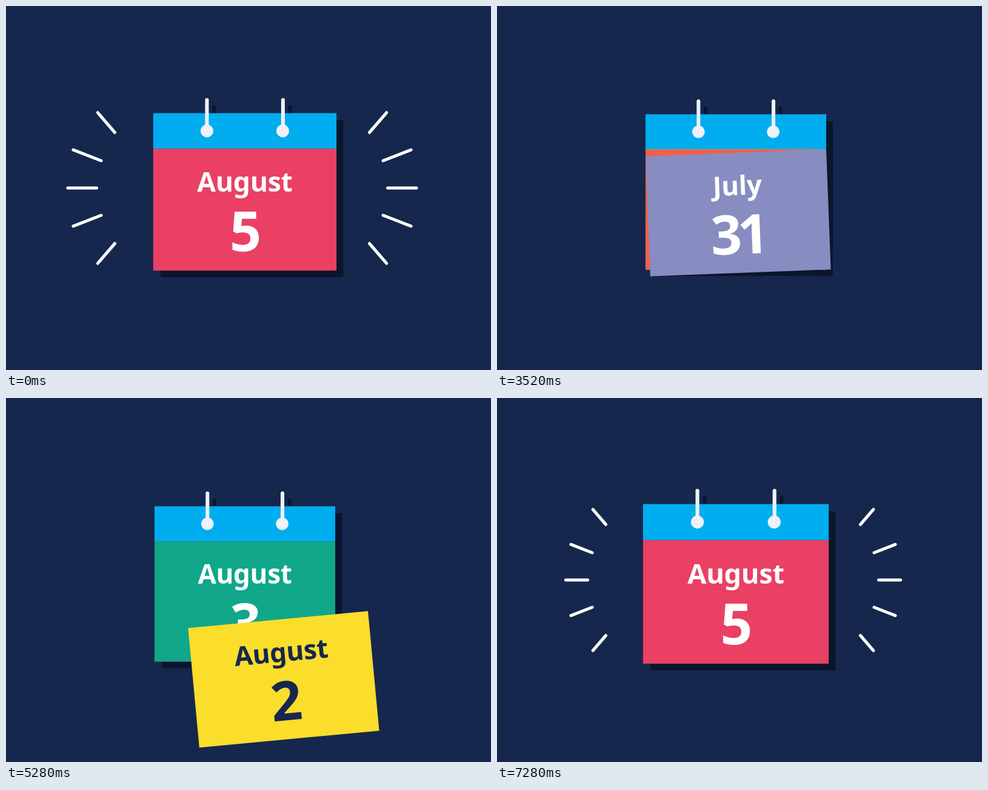
Write an HTML page that moves like this. It is 800 by 600 pixels and loops after 7320 ms.

```html
<!DOCTYPE html>
<html lang="en">
<head>
<meta charset="utf-8">
<title>Calendar</title>
<style>
  html, body { margin: 0; width: 100%; height: 100%; overflow: hidden; background: #16274e; }
  svg { display: block; width: 100%; height: 100%; }
  text { text-anchor: middle; }
  .month { font: 700 44px "Noto Sans", sans-serif; letter-spacing: -.3px; }
  .day { font: 750 90px "Open Sans", sans-serif; letter-spacing: -7px; }
  .hooks line { stroke-width: 6; stroke-linecap: round; }
</style>
</head>
<body>
<svg viewBox="0 0 800 600">
  <defs>
    <linearGradient id="redFade" x2="0" y2="1">
      <stop stop-color="#ea4064" stop-opacity=".55"/>
      <stop offset="1" stop-color="#ea4064" stop-opacity="0"/>
    </linearGradient>
    <linearGradient id="shadeFade" x2="0" y2="1">
      <stop stop-color="#0a162c"/>
      <stop offset="1" stop-color="#0a162c" stop-opacity="0"/>
    </linearGradient>
  </defs>
  <g id="rays" stroke="#fff" stroke-width="5" stroke-linecap="round"></g>
  <g id="calendar">
    <rect id="shade" x="257" y="190" width="297" fill="#0a162c"/>
    <rect id="shadeBlur" x="257" width="297" fill="url(#shadeFade)"/>
    <g class="hooks" stroke="#0a162c">
      <line x1="344" x2="344" y1="169" y2="195"/>
      <line x1="467.5" x2="467.5" y1="169" y2="195"/>
    </g>
    <rect id="pageBlur" x="245" y="434" width="298" fill="url(#redFade)"/>
    <rect x="245" y="178.5" width="298" height="58" fill="#00adef"/>
    <g class="hooks" stroke="#eef1f9" fill="#eef1f9">
      <line x1="332.3" x2="332.3" y1="157" y2="207"/>
      <line x1="456" x2="456" y1="157" y2="207"/>
      <circle cx="332.3" cy="207.3" r="10.4" stroke="none"/>
      <circle cx="455.6" cy="207.3" r="10.4" stroke="none"/>
    </g>
    <g id="pages"></g>
  </g>
</svg>
<script>
const LOOP = 7320, STEP = 40;
const BURST = 7104, BURST_GAP = 960;
const DROP = 2740, FIRST_FALL = 3280, FALL_GAP = 800;

// month, day, page colour, text colour; top page first
const PAGES = [
  ['July', 31, '#878dc1', '#fff'],
  ['August', 1, '#f1604d', '#fff'],
  ['August', 2, '#fbdd2c', '#16274e'],
  ['August', 3, '#10a78b', '#fff'],
  ['August', 4, '#296694', '#fff'],
  ['August', 5, '#ea4064', '#fff']
];

// inner end and full reach of the upper left rays
const RAYS = [
  [149.5, 300, -62.5, 0],
  [157, 255, -60.5, -23.5],
  [179.5, 208.5, -37, -43]
];

const $ = id => document.getElementById(id);
const clamp = x => Math.min(1, Math.max(0, x));
const ease = x => (1 - Math.cos(Math.PI * clamp(x))) / 2;

function add(parent, name, attrs, text = '') {
  const el = document.createElementNS('http://www.w3.org/2000/svg', name);
  set(el, attrs);
  el.textContent = text;
  return parent.appendChild(el);
}

function set(el, attrs) {
  for (const key in attrs) el.setAttribute(key, attrs[key]);
}

function show(el, on) {
  el.setAttribute('visibility', on ? 'inherit' : 'hidden');
}

const pages = PAGES.map(([month, day, fill, ink]) => {
  const g = add(document.createDocumentFragment(), 'g', {});
  add(g, 'rect', { x: 245, y: 236.3, width: 298, height: 198, fill });
  add(g, 'text', { class: 'month', x: 394, y: 306, fill: ink }, month);
  add(g, 'text', { class: 'day', x: 391.5, y: 403, fill: ink }, day);
  $('pages').prepend(g);
  return g;
});

const rays = [];
for (const [x, y, dx, dy] of RAYS) {
  for (const sx of [1, -1]) {
    for (const sy of dy ? [1, -1] : [1]) {
      rays.push({
        el: add($('rays'), 'line', {}),
        x: 389.5 + sx * (x - 389.5), y: 300 + sy * (y - 300),
        dx: sx * dx, dy: sy * dy
      });
    }
  }
}

function drawRays(u) {
  const head = ease(u / 320), tail = ease((u - 290) / 320);
  show($('rays'), head - tail > 0.01);
  for (const { el, x, y, dx, dy } of rays) {
    set(el, {
      x1: x + dx * tail, y1: y + dy * tail,
      x2: x + dx * head, y2: y + dy * head
    });
  }
}

// A page swings on one top corner, then slides off the stage.
function drawPage(page, i, t) {
  const p = Math.max(0, t - FIRST_FALL - FALL_GAP * i);
  const side = i % 2 ? -1 : 1;
  const angle = -side * 2.2 * (p / 240) ** 1.75;
  const dy = 115 * (Math.max(0, p - 240) / 160) ** 1.9;
  const pivot = side > 0 ? 543 : 245;
  show(page, t >= DROP && p < 640);
  set(page, {
    transform: `translate(${side * 0.47 * dy} ${dy}) rotate(${angle} ${pivot} 236.3)`
  });
}

function calendarScale(t, u) {
  if (t > 1540 && t < DROP) {
    return t < 1720
      ? 1 + 0.137 * ease((t - 1540) / 180)
      : 1.137 * (1 - clamp((t - 1720) / 240) ** 2);
  }
  return 1 + 0.033 * Math.sin(Math.PI * clamp(u / 280)) ** 2;
}

function draw(t) {
  let u = (t - BURST + LOOP) % LOOP;
  if (u >= BURST_GAP && u < 2 * BURST_GAP) u -= BURST_GAP;
  drawRays(u);

  const left = t >= DROP ? clamp((3042 - t) / 282) : 0;
  const scale = calendarScale(t, u);
  const blur = 36 * left ** 2;
  show($('calendar'), scale > 0.001);
  set($('calendar'), {
    transform: `translate(394 ${306 - 301 * left ** 3}) scale(${scale}) translate(-394 -306)`
  });
  set($('shade'), { height: 255 - blur });
  set($('shadeBlur'), { y: 445 - blur, height: 2 * blur });
  set($('pageBlur'), { height: blur });

  pages.slice(0, -1).forEach((page, i) => drawPage(page, i, t));
}

const start = performance.now();
function tick() {
  const t = (performance.now() - start + 5) % LOOP;
  draw(Math.floor(t / STEP) * STEP);
  requestAnimationFrame(tick);
}
tick();
</script>
</body>
</html>
```
